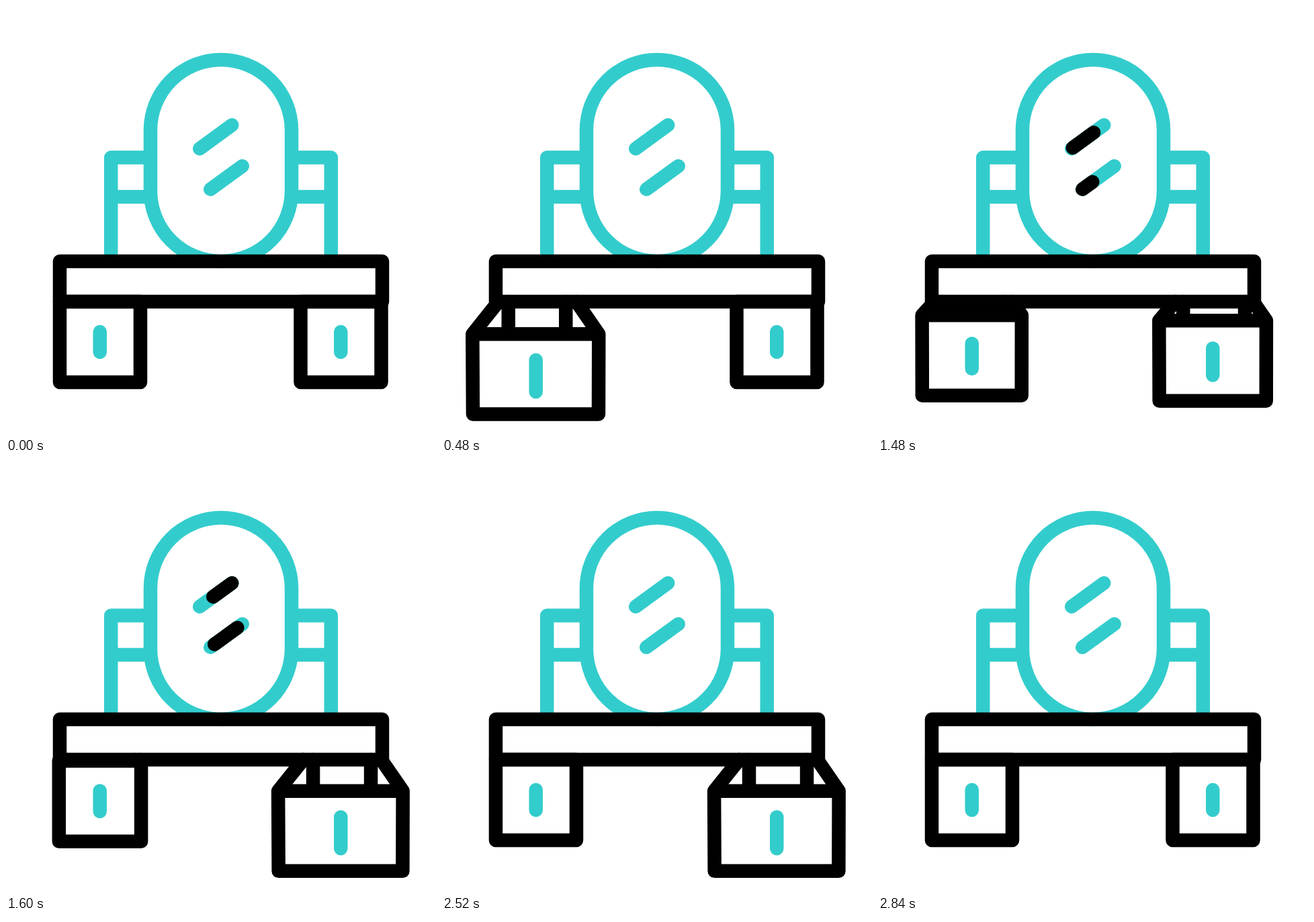
An HTML page that plays this animation: 640x640 px, repeating every 3000 ms.

```html
<!DOCTYPE html>
<html lang="en">
<head>
<meta charset="utf-8">
<title>Dressing table</title>
<style>
  html, body { margin: 0; width: 100%; height: 100%; overflow: hidden; background: #fff; }
  svg { display: block; width: 100%; height: 100%; }
  path, rect { fill: none; stroke: #000; stroke-width: 20.5; stroke-linecap: round; stroke-linejoin: round; }
  .teal { stroke: #33cccc; }
  .butt { stroke-linecap: butt; }
</style>
</head>
<body>
<svg viewBox="0 0 640 640">
  <path class="teal butt" d="M215 225.5H156.25V378M215 284H156.25M425 225.5H483.75V378M425 284H483.75"/>
  <rect class="teal" x="215" y="80" width="210" height="300" rx="105"/>
  <path class="teal" d="M288.25 212.25L336.25 177.25M304.25 272.75L351.75 238.25"/>
  <path id="glint1"/>
  <path id="glint2"/>
  <path id="boxL"/>
  <path id="boxR"/>
  <path id="knobL" class="teal"/>
  <path id="knobR" class="teal"/>
  <rect x="80" y="380" width="480" height="60"/>
</svg>
<script>
const LOOP = 3000, STEP = 40;
const $ = id => document.getElementById(id);
const mix = (a, b, p) => a + (b - a) * p;

// Smooth 0..1 progress from time a to time b
const ease = (t, a, b) => {
  const u = Math.min(1, Math.max(0, (t - a) / (b - a)));
  return u * u * (3 - 2 * u);
};

const drawers = [
  { box: $('boxL'), knob: $('knobL'), x: 80, open: 120, close: 1280 },
  { box: $('boxR'), knob: $('knobR'), x: 438.5, open: 1280, close: 2480 }
];
const SLIDE = 360;

const glints = [
  { el: $('glint1'), from: [288.25, 212.25], to: [336.25, 177.25], start: 1280 },
  { el: $('glint2'), from: [304.25, 272.75], to: [351.75, 238.25], start: 1360 }
];

function drawDrawer({ box, knob, x, open, close }, t) {
  const p = ease(t, open, open + SLIDE) - ease(t, close, close + SLIDE);
  const X = (a, b) => x + mix(a, b, p);
  const top = mix(440, 488.3, p), bottom = mix(560, 607.5, p);
  const left = X(0, -34.6), right = X(120, 153.3);
  const barA = X(11.5, 18.8), barB = X(112, 104.3);
  box.setAttribute('d',
    `M${left} ${top}H${right}L${X(120, 153)} ${bottom}H${X(0, -34)}Z` +
    `M${x + 4} 440L${left} ${top}M${x + 120} 440L${right} ${top}` +
    `M${barA} 440V${top}M${barB} 440V${top}`);
  knob.setAttribute('d', `M${x + 59.75} ${mix(485, 527, p)}V${mix(515, 574.3, p)}`);
}

function drawGlint({ el, from, to, start }, t) {
  const head = ease(t, start, start + 320);
  const tail = ease(t, start + 160, start + 520);
  const at = p => `${mix(from[0], to[0], p)} ${mix(from[1], to[1], p)}`;
  el.setAttribute('d', head > tail ? `M${at(tail)}L${at(head)}` : '');
}

function render(now) {
  const t = Math.floor((now % LOOP) / STEP) * STEP;
  drawers.forEach(d => drawDrawer(d, t));
  glints.forEach(g => drawGlint(g, t));
}

const origin = performance.now();
function tick() {
  render(performance.now() - origin);
  requestAnimationFrame(tick);
}
tick();
</script>
</body>
</html>
```
